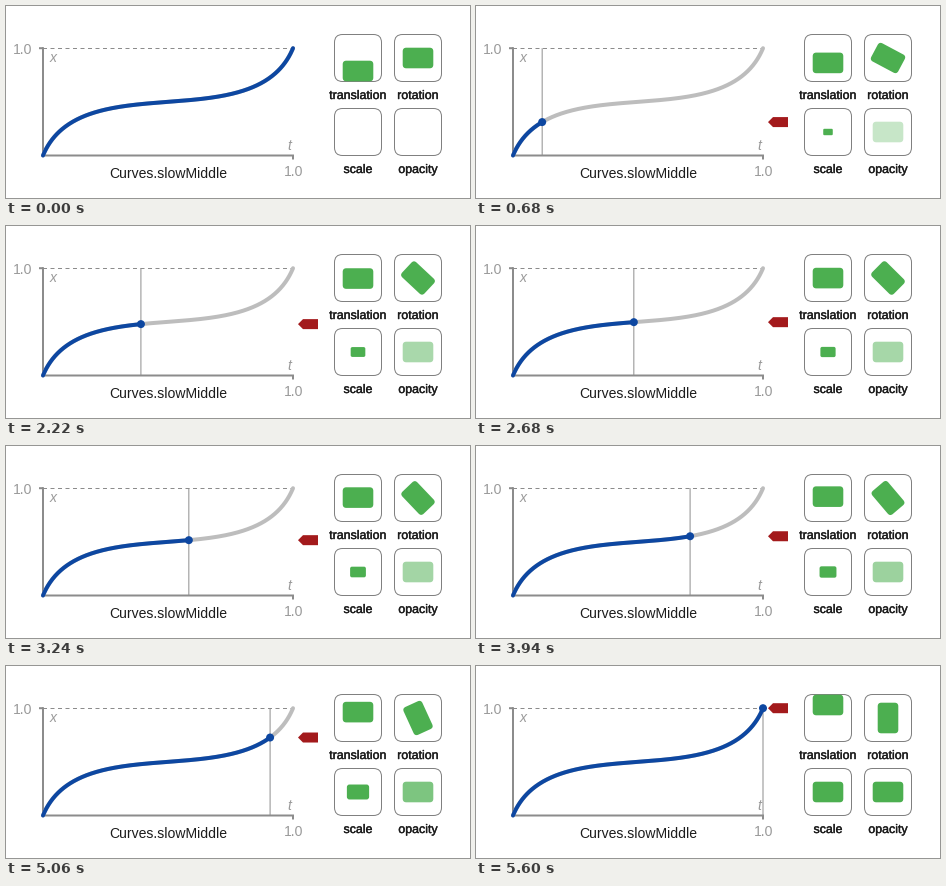
Animation, 464 px wide and 192 px high, one loop 5.62 s. Source, as a matplotlib script:

```python
import matplotlib.pyplot as plt
import numpy as np
from matplotlib.animation import FuncAnimation
from matplotlib.patches import Circle, FancyBboxPatch, Polygon
from matplotlib.patheffects import withStroke
from matplotlib.transforms import Affine2D

W, H, DPI = 464, 192, 64
PT = 72 / DPI  # points per pixel
STEPS = 120
TICK = 20
TICKS = 281

BLUE, GREEN, RED = "#0d47a1", "#4caf50", "#a31a1c"
AXIS, PALE, MUTED, INK = "#8c8c8c", "#bdbdbd", "#9a9a9a", "#1c1c1c"

LEFT, RIGHT, TOP, BOTTOM = 37, 287, 42.2, 149.5

plt.rcParams["font.family"] = "Liberation Sans"
fig = plt.figure(figsize=(W / DPI, H / DPI), dpi=DPI, facecolor="white")
ax = fig.add_axes([0, 0, 1, 1])
ax.set_xlim(0, W)
ax.set_ylim(H, 0)
ax.axis("off")


def cubic(s, a, b):
    return 3 * a * s * (1 - s) ** 2 + 3 * b * s**2 * (1 - s) + s**3


# Cubic(0.15, 0.85, 0.85, 0.15)
S = np.linspace(0, 1, 601)
T, V = cubic(S, 0.15, 0.85), cubic(S, 0.85, 0.15)


def to_x(t):
    return LEFT + t * (RIGHT - LEFT)


def to_y(v):
    return BOTTOM - v * (BOTTOM - TOP)


def line(xs, ys, color, width, z, **kw):
    kw.setdefault("solid_capstyle", "butt")
    return ax.plot(xs, ys, color=color, lw=width * PT, zorder=z,
                   snap=False, **kw)[0]


def text(x, y, label, size, color, **kw):
    kw.setdefault("ha", "center")
    return ax.text(x, y, label, fontsize=size * PT, color=color,
                   va="baseline", zorder=6, **kw)


def rounded(x, y, w, h, r, **kw):
    box = FancyBboxPatch((x, y), w, h,
                         boxstyle=f"round,pad=0,rounding_size={r}", **kw)
    return ax.add_patch(box)


def tile(cx, cy, label):
    rounded(cx - 23.5, cy - 23.5, 47, 47, 8, fc="white", ec="#808080",
            lw=PT, zorder=1)
    caption = text(cx, cy + 41, label, 12.4, INK)
    caption.set_path_effects([withStroke(linewidth=0.4 * PT, foreground=INK)])
    return rounded(-15.3, -10.3, 30.6, 20.6, 3.6, fc=GREEN, ec="none",
                   zorder=2)


def place(patch, cx, cy, scale=1, angle=0):
    move = Affine2D().scale(scale).rotate_deg(angle).translate(cx, cy)
    patch.set_transform(move + ax.transData)


# Chart
line([LEFT, RIGHT], [42.5, 42.5], AXIS, 1, 1, dashes=(4, 3.5))
line([LEFT - 4, LEFT], [TOP, TOP], AXIS, 2, 1)
line([LEFT, LEFT], [TOP - 1, BOTTOM + 1], AXIS, 2, 1)
line([LEFT, RIGHT + 1], [BOTTOM, BOTTOM], AXIS, 2, 1)
line([RIGHT, RIGHT], [BOTTOM, BOTTOM + 4], AXIS, 2, 1)
text(26.5, 48, "1.0", 14, MUTED, ha="right")
text(287.5, 170, "1.0", 14, MUTED)
text(47, 56, "x", 14, MUTED, style="italic")
text(283.5, 144, "t", 14, MUTED, style="italic")
text(162, 172, "Curves.slowMiddle", 14, INK)

line(to_x(T), to_y(V), PALE, 4, 2, solid_capstyle="round")
trace = line([], [], BLUE, 4, 4, solid_capstyle="round")
cursor = line([], [], "#8f8f8f", 1, 3)
dot = ax.add_patch(Circle((0, 0), 4, fc=BLUE, ec="none", zorder=5))
pointer = ax.add_patch(Polygon([(0, 0), (1, 0), (1, 1)], fc=RED, ec="none",
                               zorder=5))

# Samples
slide = tile(352, 52, "translation")
spin = tile(412, 52, "rotation")
grow = tile(352, 126, "scale")
fade = tile(412, 126, "opacity")
place(fade, 412, 126)


def step_at(tick):
    """Steps last 20, 100 and 20 ms in turn."""
    group, rest = divmod(tick, 7)
    return 3 * group + (rest > 0) + (rest == 6)


def update(tick):
    step = step_at(tick)
    t = step / STEPS
    s = np.interp(t, T, S)
    v = cubic(s, 0.85, 0.15)
    x, y = to_x(t), to_y(v)
    running = step > 0

    part = np.linspace(0, s if running else 1, 300)
    trace.set_data(to_x(cubic(part, 0.15, 0.85)), to_y(cubic(part, 0.85, 0.15)))
    cursor.set_data([x, x], [TOP, BOTTOM])
    dot.center = x, y
    pointer.set_xy([(292, y), (297, y - 5), (312, y - 5),
                    (312, y + 5), (297, y + 5)])
    for item in (cursor, dot, pointer):
        item.set_visible(running)

    place(slide, 352, 65 - 26 * v)
    place(spin, 412, 52, angle=90 * v)
    place(grow, 352, 126, scale=v)
    grow.set_visible(running)
    fade.set_alpha(float(np.clip(v, 0, 1)))
    return trace, cursor, dot, pointer, slide, spin, grow, fade


anim = FuncAnimation(fig, update, frames=TICKS, interval=TICK, repeat=True,
                     repeat_delay=0, blit=False)
plt.show()
```
